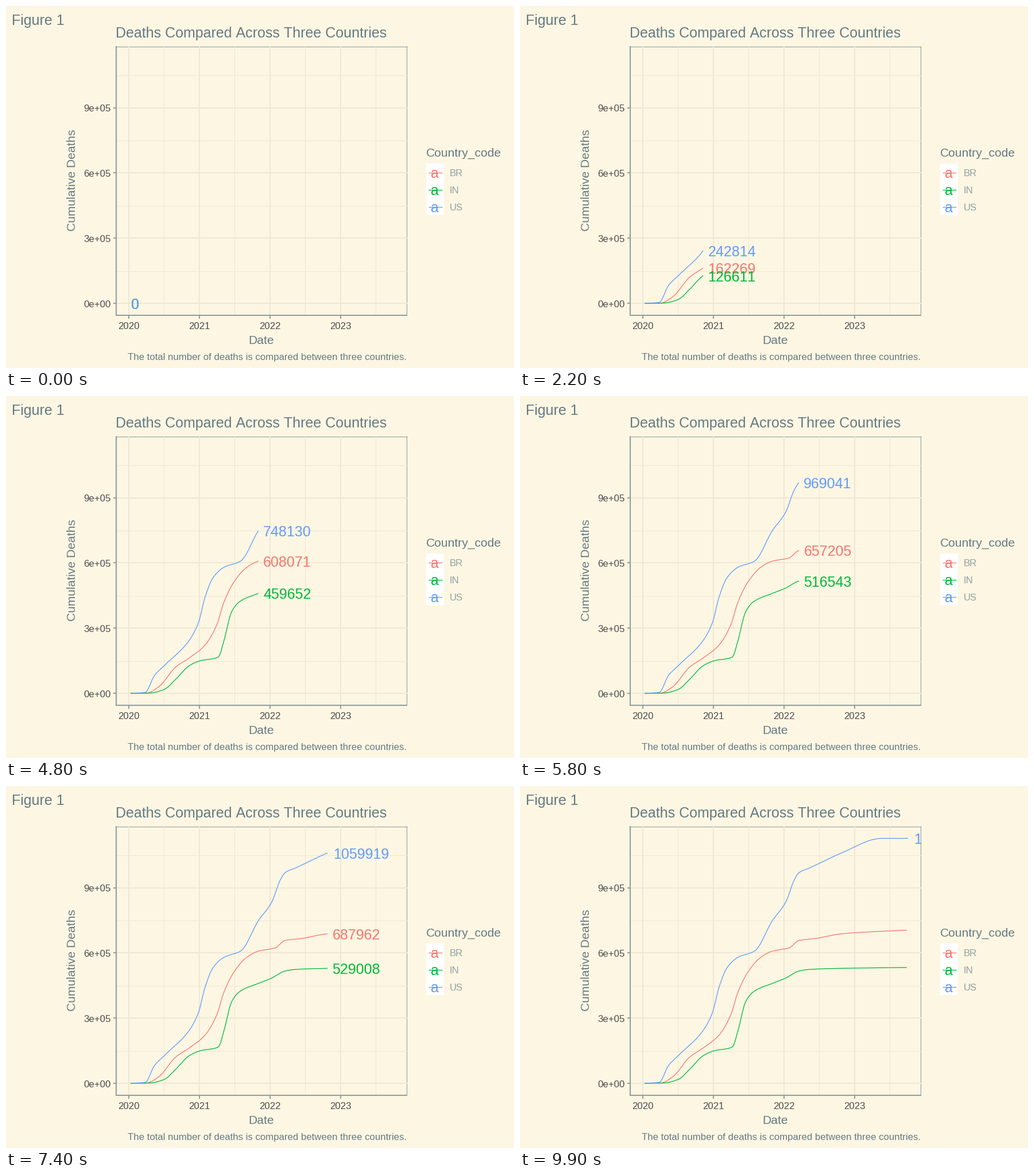
These frames come from a looping animation (885x632 px, 10000 ms). A matplotlib script:

```python
import numpy as np
import matplotlib.pyplot as plt
from matplotlib.animation import FuncAnimation
from matplotlib.patches import Rectangle
from matplotlib.transforms import Bbox

W, H, DPI = 885, 632, 100
FRAMES, INTERVAL = 100, 100
LEFT, RIGHT, TOP, BOTTOM = 192, 699, 70, 540
X0, STEP = 217.0, 4.637            # head of the curves and its advance per frame
ZERO, PER_K = 519.0, 113.8 / 300   # pixel row of zero, pixels per thousand
JAN, YEAR = 214.3, 122.95          # column of January 2020, pixels per year

PAPER, GRID, LINE, TITLE, TICK = "#fdf6e3", "#eee8d5", "#93a1a1", "#657b83", "#4d4d4d"
BIG, MID, SMALL = 25, 21, 16.75
THIN, THICK, CURVE = 1.1, 2.1, 1.3

# A large kerning factor spaces the letters without kerning
plt.rcParams.update({"font.family": "Liberation Sans", "text.kerning_factor": 6})

# Turning points of each curve: time in frames, deaths in thousands
BR = [(0, 0), (6, 1), (10.5, 29), (17, 121), (22, 162.269), (28, 222), (32.5, 318),
      (35, 416.949), (39, 515), (43.8, 581), (48, 608.071), (54.3, 623),
      (58, 657.205), (64, 666), (74, 687.962), (98.5, 705)]
IN = [(0, 0), (7, 1), (12.6, 17.4), (17, 65), (22, 126.611), (26, 149), (33, 167),
      (35, 238.27), (38, 376), (41, 422), (48, 459.652), (53, 484),
      (58, 516.543), (62, 524), (74, 529.008), (98.5, 533)]
US = [(0, 0), (5.5, 4), (9, 82), (13, 131), (22, 242.814), (25.5, 325), (28, 443),
      (31, 532), (35, 579.222), (41.4, 609), (48, 748.13), (53, 833), (56.3, 937),
      (58, 969.041), (62, 991), (74, 1059.919), (89, 1127), (99, 1127.152)]


def monotone(points):
    """Monotone cubic interpolation through the points."""
    px, py = np.array(points, float).T
    h, d = np.diff(px), np.diff(py) / np.diff(px)
    w1, w2 = 2 * h[1:] + h[:-1], h[1:] + 2 * h[:-1]
    m = np.concatenate(([d[0]], (w1 + w2) / (w1 / (d[:-1] + 1e-9) + w2 / (d[1:] + 1e-9)), [d[-1]]))

    def curve(x):
        i = np.clip(np.searchsorted(px, x, side="right") - 1, 0, len(h) - 1)
        t = (x - px[i]) / h[i]
        return (py[i] * (1 + 2 * t) * (1 - t) ** 2 + m[i] * h[i] * t * (1 - t) ** 2
                + py[i + 1] * t * t * (3 - 2 * t) + m[i + 1] * h[i] * t * t * (t - 1))
    return curve


fig = plt.figure(figsize=(W / 100, H / 100), dpi=DPI, facecolor=PAPER)
ax = fig.add_axes([0, 0, 1, 1])
ax.set_xlim(0, W)
ax.set_ylim(H, 0)
ax.axis("off")


def pt(px):
    return px * 72 / DPI


def seg(x, y, color, width, z=1):
    return ax.plot(x, y, color=color, lw=pt(width), zorder=z, solid_capstyle="butt")[0]


def vline(x, y0, y1, color, width, z=1):
    x -= 0.5 * (width < 2)   # one-pixel lines snap half a pixel further
    seg([x, x], [y0, y1], color, width, z)


def hline(y, x0, x1, color, width, z=1):
    y += 0.5 * (width < 2)
    seg([x0, x1], [y, y], color, width, z)


def label(x, y, s, size, color=TITLE, z=6, **kw):
    return ax.text(x, y, s, size=pt(size), color=color, va="baseline", zorder=z, **kw)


# Panel border sits under the grid; the axis lines lie on top
hline(TOP + 0.5, LEFT, RIGHT, LINE, THIN, 0)
vline(RIGHT - 0.5, TOP, BOTTOM, LINE, THIN, 0)
for i in range(4):
    x = JAN + YEAR * i
    vline(x + YEAR / 2, TOP, BOTTOM, GRID, THIN)
    vline(x, TOP, BOTTOM, GRID, THICK, 2)
    vline(x, BOTTOM, 545.5, LINE, THICK, 2)
    label(x, 563.5, str(2020 + i), SMALL, TICK, ha="center")

    y = ZERO - 300 * i * PER_K
    hline(y - 150 * PER_K, LEFT, RIGHT, GRID, THIN)
    hline(y, LEFT, RIGHT, GRID, THICK, 2)
    hline(y, 186.5, LEFT, LINE, THICK, 2)
    label(182.5, y + 6.5, f"{3 * i}e+0{5 if i else 0}", SMALL, TICK, ha="right")
vline(LEFT, TOP, BOTTOM + 1, LINE, THICK, 3)
hline(BOTTOM, LEFT - 1, RIGHT, LINE, THICK, 3)

label(10.5, 32.5, "Figure 1", BIG)
label(191, 54.5, "Deaths Compared Across Three Countries", BIG)
label(445, 589.5, "Date", MID, ha="center")
label(121, 304.5, "Cumulative Deaths", MID, ha="center", rotation=90, rotation_mode="anchor")
label(698.5, 618, "The total number of deaths is compared between three countries.",
      SMALL, ha="right")
label(731.5, 263, "Country_code", MID)

ax.add_patch(Rectangle((732, 274.5), 31, 90.5, fc="white", ec="none", zorder=1))
panel = Bbox.from_extents(LEFT, H - BOTTOM, RIGHT, H - TOP)
series = []
for i, (code, points, color) in enumerate((("BR", BR, "#f8766d"), ("IN", IN, "#00ba38"),
                                           ("US", US, "#619cff"))):
    y = 290 + 30.2 * i
    hline(y, 735.5, 760, color, CURVE, 4)
    label(747.3, y + 10, "a", BIG, color, ha="center")
    label(772.5, y + 7, code, SMALL, LINE)
    count = label(0, 0, "", BIG, color, z=7 + i, clip_on=True)
    count.set_clip_box(panel)
    series.append((monotone(points), points[-1][0], seg([], [], color, CURVE, 4 + i / 10), count))


def update(n):
    for curve, end, line, count in series:
        head = min(n, end)
        ts = np.append(np.arange(0, head, 0.5), head)
        xs, ys = X0 + STEP * ts, ZERO - PER_K * curve(ts)
        line.set_data(xs, ys)
        text = str(int(round(1000 * curve(head))))
        # The label starts a tenth of its own width after the head
        count.set_text(text if n <= end else "")
        count.set_position((xs[-1] + 0.0556 * BIG * len(text), ys[-1] + 9.7))
    return [artist for s in series for artist in s[2:]]


anim = FuncAnimation(fig, update, frames=FRAMES, interval=INTERVAL,
                     init_func=lambda: update(0), repeat=True, repeat_delay=0, blit=False)
plt.show()
```
